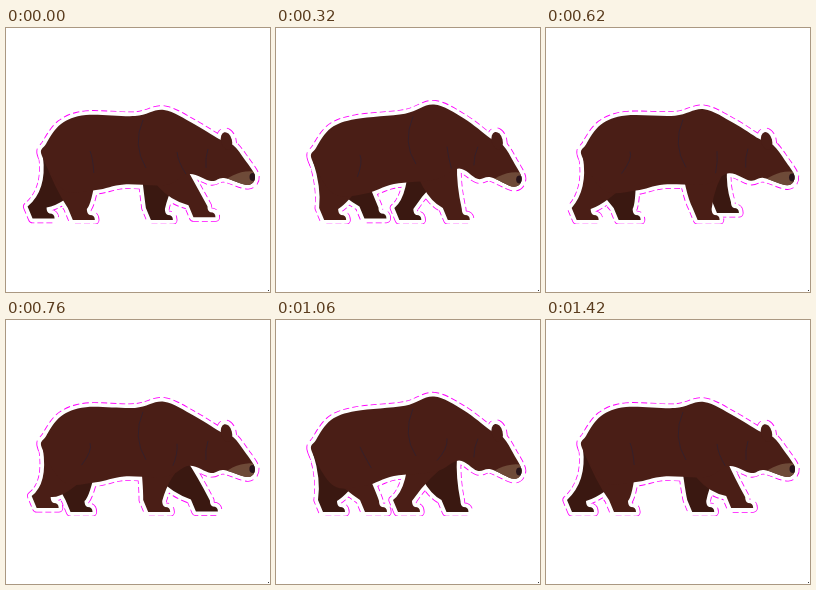
Recreate the animation shown at these times as an HTML page with a canvas. Size 264 by 264 pixels, loop 1.44 s.

```html
<!DOCTYPE html>
<html lang="en">
<head>
<meta charset="utf-8">
<title>Walking bear</title>
<style>
  html, body { margin: 0; width: 100%; height: 100%; overflow: hidden; background: #fff; }
  canvas { display: block; width: 264px; height: 264px; }
</style>
</head>
<body>
<canvas id="stage" width="264" height="264"></canvas>
<script>
const ctx = document.getElementById('stage').getContext('2d');
const LOOP = 1440, FRAME = 20, GROUND = 192;
const COAT = '#4a1e16', SHADE = '#3a1811', CREASE = '#35202a';
const MUZZLE = '#6e4a38', NOSE = '#28141a', EDGE = '#ff00ff';

// Key points around the torso and head, clockwise from the tail.
const BODY = [
  [36, 128], [40, 116], [55, 96], [80, 87], [129, 88], [158, 82], [188, 96],
  [213, 111], [227, 117], [239, 132], [249, 148], [242, 157], [218, 150],
  [205, 153], [183, 146], [160, 157], [118, 156.5], [90, 162], [58, 162]
];

// Gait: the paw slides back from `fore` to `aft`, then swings forward again.
const HIND = { start: 1060, stance: 1080, fore: 98, aft: 35 };
const FRONT = { start: 50, stance: 1010, fore: 199, aft: 131 };

const smooth = s => s * s * (3 - 2 * s);
const clamp = v => Math.max(0, Math.min(1, v));

function paw(gait, t) {
  const age = ((t - gait.start) % LOOP + LOOP) % LOOP;
  const reach = gait.fore - gait.aft;
  if (age < gait.stance) return { x: gait.fore - reach * age / gait.stance, y: GROUND };
  const s = (age - gait.stance) / (LOOP - gait.stance);
  return { x: gait.aft + reach * smooth(s), y: GROUND - 8 * Math.sin(Math.PI * s) };
}

// The shoulders rise while the rump sinks and the head nods.
function makePose(t) {
  const lift = (1 - Math.cos(2 * Math.PI * (t + 10) / 720)) / 2;
  const angle = lift * 0.11, c = Math.cos(angle), s = Math.sin(angle);
  return (x, y) => {
    if (x < 192) return [x, y + lift * (4 - 9.5 * smooth(clamp((x - 80) / 80)))];
    const dx = x - 205, dy = y - 120;
    return [205 + dx * c - dy * s, 120 + dx * s + dy * c - 2 * lift];
  };
}

function closedCurve(points) {
  const path = new Path2D(), n = points.length;
  const at = i => points[(i + n) % n];
  path.moveTo(...points[0]);
  for (let i = 0; i < n; i++) {
    const [a, b, c, d] = [at(i - 1), at(i), at(i + 1), at(i + 2)];
    path.bezierCurveTo(
      b[0] + (c[0] - a[0]) / 6, b[1] + (c[1] - a[1]) / 6,
      c[0] - (d[0] - b[0]) / 6, c[1] - (d[1] - b[1]) / 6, ...c);
  }
  path.closePath();
  return path;
}

function oval([x, y], rx, ry, tilt) {
  const path = new Path2D();
  path.ellipse(x, y, rx, ry, tilt, 0, 2 * Math.PI);
  return path;
}

// Curve from a to b that passes through mid.
function bend(path, a, mid, b) {
  path.quadraticCurveTo(2 * mid[0] - (a[0] + b[0]) / 2, 2 * mid[1] - (a[1] + b[1]) / 2, ...b);
}

function leg(hipBack, kneeBack, kneeFront, hipFront, { x, y }) {
  const path = new Path2D();
  const heel = [x - 14, y - 12], instep = [x + 5, y - 11];
  path.moveTo(...hipBack);
  bend(path, hipBack, kneeBack, heel);
  path.lineTo(x - 9, y);
  path.lineTo(x + 13, y);
  path.quadraticCurveTo(x + 13, y - 5, x + 8, y - 5);
  path.quadraticCurveTo(x + 5, y - 6, ...instep);
  bend(path, instep, kneeFront, hipFront);
  path.closePath();
  return path;
}

function hindLeg(t, pose) {
  const p = paw(HIND, t), k = p.x - HIND.aft;
  return leg(pose(37, 129), [35 + k * 0.35, 158], [61 + k * 0.6, 170], pose(90, 146), p);
}

function frontLeg(t, pose) {
  const p = paw(FRONT, t), k = p.x - FRONT.aft;
  return leg(pose(133, 122), [129 + k * 0.36, 159], [155 + k * 0.54, 158], pose(181, 141), p);
}

function crease(from, control, to) {
  ctx.beginPath();
  ctx.moveTo(...from);
  ctx.quadraticCurveTo(...control, ...to);
  ctx.stroke();
}

function outline(paths, color, width, dash) {
  ctx.strokeStyle = color;
  ctx.lineWidth = width;
  ctx.setLineDash(dash);
  paths.forEach(path => ctx.stroke(path));
  ctx.setLineDash([]);
}

function fill(color, ...paths) {
  ctx.fillStyle = color;
  paths.forEach(path => ctx.fill(path));
}

function draw(t) {
  const pose = makePose(t);
  const body = closedCurve(BODY.map(point => pose(...point)));
  const ear = oval(pose(220.5, 113), 5.5, 9, -0.25);
  const far = [hindLeg(t + LOOP / 2, pose), frontLeg(t + LOOP / 2, pose)];
  const near = [hindLeg(t, pose), frontLeg(t, pose), body, ear];

  ctx.fillStyle = '#fff';
  ctx.fillRect(0, 0, 264, 264);
  ctx.lineJoin = 'round';
  ctx.save();
  ctx.beginPath();
  ctx.rect(0, 0, 264, 196);
  ctx.clip();
  outline([...far, ...near], EDGE, 9.2, [6, 3]);
  outline([...far, ...near], '#fff', 7.6, []);
  ctx.restore();

  fill(SHADE, ...far);
  fill(COAT, ...near);

  ctx.save();
  ctx.clip(body);
  fill(MUZZLE, oval(pose(235, 157), 23, 12, -0.35));
  fill(NOSE, oval(pose(247, 149), 3.5, 4, 0));
  ctx.restore();

  const hind = paw(HIND, t).x, front = paw(FRONT, t).x;
  ctx.strokeStyle = CREASE;
  ctx.lineWidth = 1;
  crease(pose(84, 123), pose(87, 130), pose(62 + hind * 0.34, 145));
  crease(pose(137, 92), pose(126, 117), pose(140, 140));
  crease(pose(171, 124), pose(172, 134), pose(123 + front * 0.29, 146));
  crease(pose(202, 121), pose(199, 130), pose(200, 140));

  ctx.fillStyle = '#333';
  ctx.fillRect(262, 262, 1, 1);
}

function tick(now) {
  draw(Math.floor((now % LOOP) / FRAME) * FRAME);
  requestAnimationFrame(tick);
}
draw(0);
requestAnimationFrame(tick);
</script>
</body>
</html>
```
